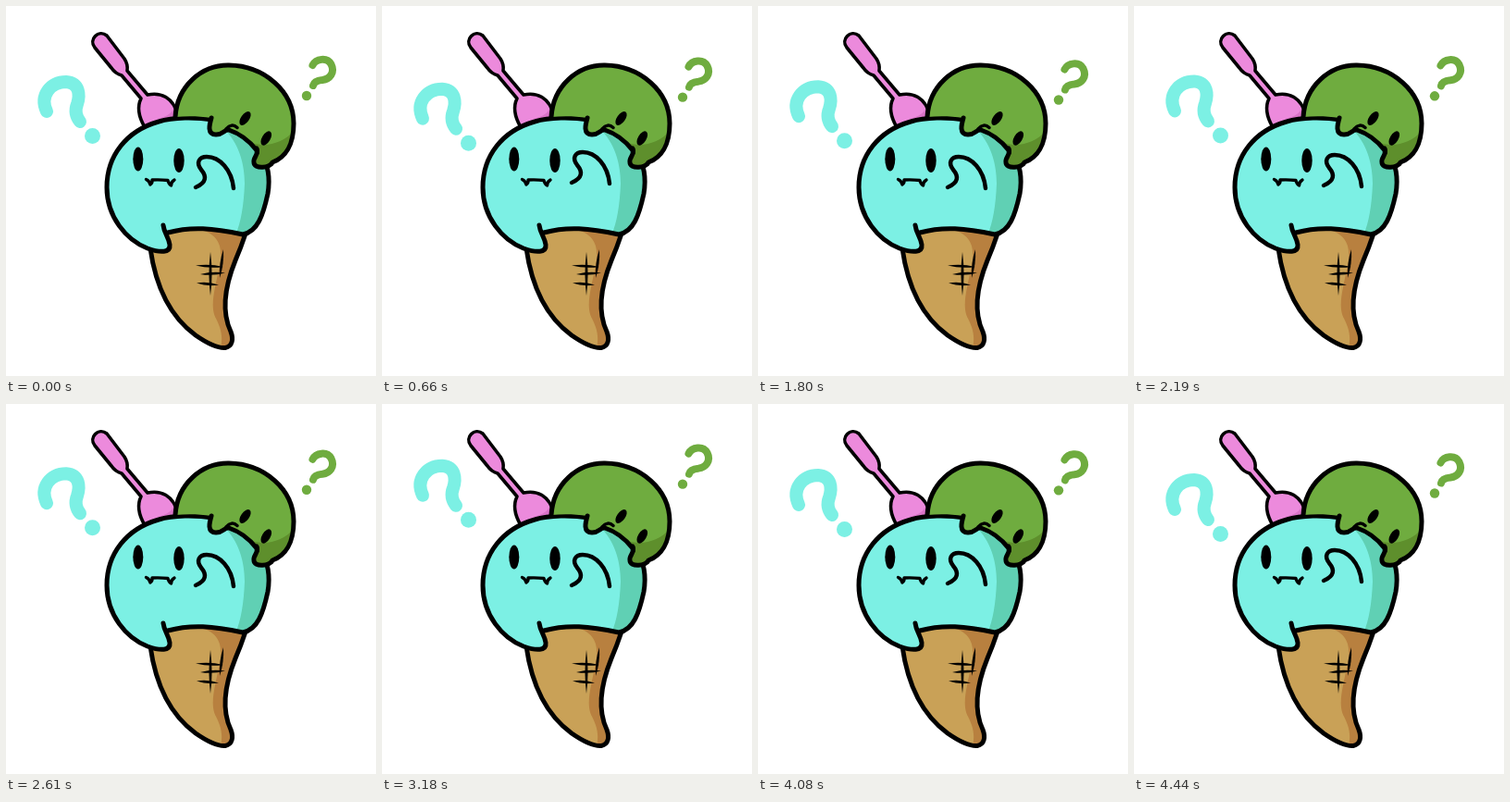
Recreate the animation shown at these times as an HTML page with a canvas. Size 400 by 400 pixels, loop 4.5 s.

```html
<!DOCTYPE html>
<html lang="en">
<head>
<meta charset="utf-8">
<title>Puzzled ice cream</title>
<style>
  html, body { margin: 0; width: 100%; height: 100%; overflow: hidden; background: #fff; }
  canvas { display: block; width: 100vw; height: 100vh; }
</style>
</head>
<body>
<canvas id="stage"></canvas>
<script>
const canvas = document.getElementById('stage');
const ctx = canvas.getContext('2d');
const LOOP = 4500, STEP = 30, INK = '#000';
const C = {
  mint: '#7cf0e4', mintDark: '#60d0b4',
  green: '#6fac3f', greenDark: '#5e8f2c',
  pink: '#ec8adc', pinkDark: '#da74c8',
  cone: '#c9a157', coneDark: '#b8803f'
};

const spoon = new Path2D('M150 131 C143 119 142 108 146 100 L125 75 Q118 73 114 67 L96 45 C89 36 100 25 109 32 L128 57 Q132 63 131 70 L153 96 C167 93 181 98 186 119');
const spoonShade = new Path2D('M183 106 C181 116 173 120 163 122 L186 124 Z');
const cone = new Path2D('M156 262 C161 298 175 334 205 356 C218 365 230 370 237 369.500 C245 368 246 360 243 352 C234 333 235 307 248 275 Q254 261 259 246 L205 230 L172 240');
const coneShade = new Path2D('M203 240 C226 244 234 255 232 275 C227 302 220 322 226 336 C232 347 235 357 232 370 L250 372 L262 244 Z');
const scoop = new Path2D('M224 123 C205 120 181 120 165 125 C130 135 109 162 109 196 C109 228 130 253 153 262 C167 267 178 267 177 258 C176 252 172 248 171 242 L176 246 C200 238 224 240 256 247 C272 244 278 226 283 203 C286 185 283 172 276 158 C267 140 245 126 224 123 Z');
const scoopLine = new Path2D('M224 123 C205 120 181 120 165 125 C130 135 109 162 109 196 C109 228 130 253 153 262 C167 267 178 267 177 258 C176 250 171 246 170 237 M175 245 C200 238 224 240 256 247 C272 244 278 226 283 203 C286 185 283 172 276 158');
const scoopShade = new Path2D('M232 130 C249 143 258 166 258 192 C257 216 254 234 248 248 L290 250 L290 150 Z');
const topScoop = new Path2D('M183 120 C185 86 212 63.500 241 64 C279 64.500 311 92 311 127 C311 150 302 164 288 169 C286 175 268 177 268 169 C267 164 273 161 271 156 C264 147 253 138 241 134 C236 133 235 139 227 139 C217 139 220 128 222 121 C209 119 195 119 183 120 Z');
const topLine = new Path2D('M183 120 C185 86 212 63.500 241 64 C279 64.500 311 92 311 127 C311 150 302 164 288 169 C286 175 268 177 268 169 C267 164 273 161 271 156 C264 147 253 138 241 134 C236 133 235 139 227 139 C217 139 220 128 222 121');
const topShade = new Path2D('M246 134 C264 156 295 155 313 133 L306 164 L270 180 L271 156 Z');
const frown = new Path2D('M238 133 Q244 126 250 131.500 M271 153 Q273 155 272 159');
const mouth = new Path2D('M151.500 187.500 Q155 189 156 193 Q158.500 191 158 188 Q167 187.500 175 188.500 Q176 193 178.500 194 Q178.500 190 182 188');
const arm = new Path2D('M205 196 C217 191 217 184 211 177 C205 169 209 163 217 163 C231 163 244 177 246 197');
const mintHook = new Path2D('M44 114 C36 97 48 82 65 82 C80 83 80 97 77 106 C74 114 76 120 80 125');
const greenHook = new Path2D('M331.500 64 C335 57 347 55 351.500 63 C356 72 350 79 342 80 C336 80.500 333 82 332 86');

// Linear interpolation through [time, value] pairs
function track(t, keys) {
  for (let i = 1; i < keys.length; i++) {
    const [t0, a] = keys[i - 1], [t1, b] = keys[i];
    if (t <= t1) return a + (b - a) * (t - t0) / (t1 - t0);
  }
  return keys[keys.length - 1][1];
}

function line(path, width, color = INK) {
  ctx.lineWidth = width;
  ctx.strokeStyle = color;
  ctx.stroke(path);
}

function fill(path, color) {
  ctx.fillStyle = color;
  ctx.fill(path);
}

function shaded(body, color, shade, shadeColor, outline, width) {
  fill(body, color);
  ctx.save();
  ctx.clip(body);
  fill(shade, shadeColor);
  ctx.restore();
  line(outline, width);
}

function oval(x, y, rx, ry, turn = 0, color = INK) {
  ctx.fillStyle = color;
  ctx.beginPath();
  ctx.ellipse(x, y, rx, ry, turn, 0, Math.PI * 2);
  ctx.fill();
}

// Ink mark with pointed ends
function scratch(x0, y0, x1, y1) {
  const len = Math.hypot(x1 - x0, y1 - y0);
  const nx = (y0 - y1) / len * 3, ny = (x1 - x0) / len * 3;
  const mx = (x0 + x1) / 2, my = (y0 + y1) / 2;
  ctx.fillStyle = INK;
  ctx.beginPath();
  ctx.moveTo(x0, y0);
  ctx.quadraticCurveTo(mx + nx, my + ny, x1, y1);
  ctx.quadraticCurveTo(mx - nx, my - ny, x0, y0);
  ctx.fill();
}

function shifted(dy, draw) {
  ctx.save();
  ctx.translate(0, dy);
  draw();
  ctx.restore();
}

function drawCone() {
  shaded(cone, C.cone, coneShade, C.coneDark, cone, 5);
  scratch(221, 266, 221, 313);
  scratch(235, 263, 231, 294);
  scratch(205, 280.500, 235, 282);
  scratch(210, 290, 237, 288.500);
  scratch(206, 299.500, 230, 301.500);
}

function drawFace(armY) {
  oval(142.800, 165.500, 5.500, 13);
  oval(187, 167, 5.700, 13);
  line(mouth, 3.400);
  shifted(armY, () => line(arm, 4.500));
}

function drawTop(open) {
  shaded(topScoop, C.green, topShade, C.greenDark, topLine, 5);
  line(frown, 3.500);
  const ry = 2 + 6.500 * open, rx = 3.400 + 1.100 * open;
  oval(258.500, 121.500, rx, ry, 0.620);
  oval(281.300, 143, rx, ry, 0.540);
}

function drawScene(t) {
  ctx.fillStyle = '#fff';
  ctx.fillRect(0, 0, 400, 400);
  ctx.lineCap = ctx.lineJoin = 'round';

  const mintY = track(t, [[0, 0], [1200, 14], [3300, -17], [4410, 0]]);
  const greenY = track(t, [[0, 0], [1800, 4.5], [3240, -11], [LOOP, 0]]);
  const armY = track(t % 270, [[0, 0], [30, -2], [75, -5], [120, -5], [180, 0], [270, 0]]);
  const open = track(t, [[0, 1], [3570, 1], [3675, 0], [3705, 0], [3810, 1], [LOOP, 1]]);

  shifted(mintY, () => {
    line(mintHook, 14, C.mint);
    oval(93.500, 140.500, 8.500, 8.500, 0, C.mint);
  });
  shifted(greenY, () => {
    line(greenHook, 8, C.green);
    oval(325, 97, 5.200, 5.200, 0, C.green);
  });

  shaded(spoon, C.pink, spoonShade, C.pinkDark, spoon, 3.600);
  drawCone();
  shaded(scoop, C.mint, scoopShade, C.mintDark, scoopLine, 5);
  drawTop(open);
  drawFace(armY);
}

function resize() {
  const ratio = window.devicePixelRatio || 1;
  canvas.width = Math.round(innerWidth * ratio);
  canvas.height = Math.round(innerHeight * ratio);
  ctx.setTransform(canvas.width / 400, 0, 0, canvas.height / 400, 0, 0);
}

const start = performance.now();
function tick() {
  let t = Math.floor((performance.now() - start) % LOOP / STEP) * STEP;
  if (t < 60) t = 0;              // short rest at both ends of the loop
  drawScene(Math.min(t, 4440));
  requestAnimationFrame(tick);
}

addEventListener('resize', resize);
resize();
tick();
</script>
</body>
</html>
```
